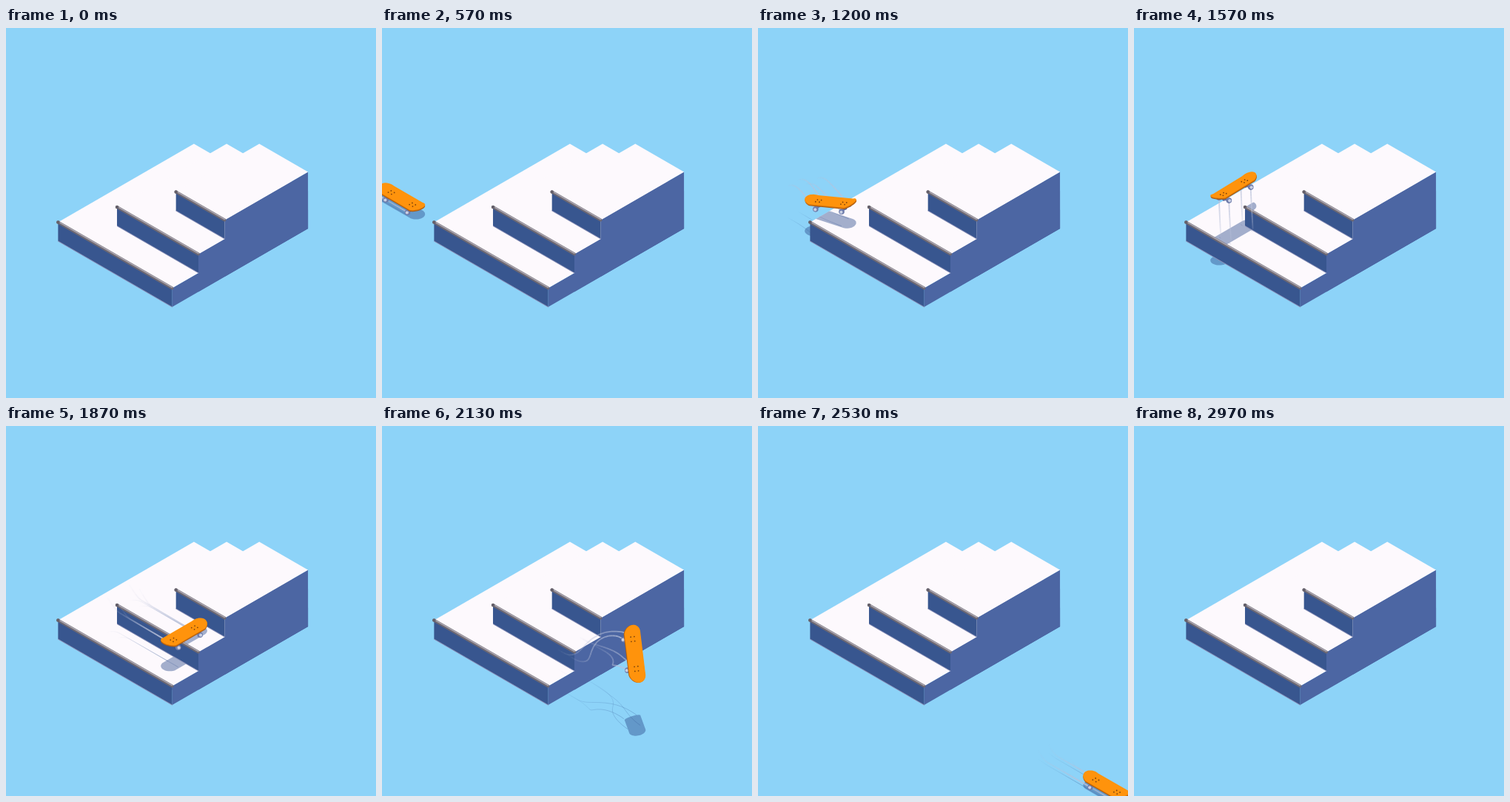
Write an HTML page with a canvas that moves like this. It is 500x500 px and loops after 3.03 s.

```html
<!DOCTYPE html>
<html lang="en">
<head>
<meta charset="utf-8">
<title>Skateboard on steps</title>
<style>
html, body { margin: 0; width: 100%; height: 100%; overflow: hidden; background: #8dd3f8; }
canvas { display: block; width: 500px; height: 500px; }
</style>
</head>
<body>
<canvas id="stage" width="500" height="500"></canvas>
<script>
const ctx = document.getElementById('stage').getContext('2d');
const LOOP = 3030, TRAIL = 210, STEP = 10, DEPTH = 212;

// Board attitudes: long axis and rough deck normal.
const aim = (axis, normal = [0, 0, 1]) => ({ axis, normal });
const FLAT = aim([1, 0, 0]), POP = aim([.87, 0, .5]), TURN = aim([.8, -.6, 0]);
const ACROSS = aim([0, -1, 0]), LEAN = aim([0, -1, .03], [-.25, 0, 1]);
const FLIP = aim([.49, .32, -.81], [.81, .17, .49]);

// time, x, sideways shift, height, attitude
const KEYS = [
  [300, -75, 0, 10, FLAT],
  [640, 38, 0, 10, FLAT],
  [870, 46, 0, 38, POP],
  [1070, 68, 0, 62, POP],
  [1310, 126, 0, 35, TURN],
  [1390, 139, 0, 35, ACROSS],
  [1570, 135, 0, 87, LEAN],
  [1625, 145, 7, 97, LEAN],
  [1700, 175, 25, 59, ACROSS],
  [1940, 267, 25, 58, ACROSS],
  [2130, 341, 19, 95, FLIP],
  [2360, 413, 0, 10, FLAT],
  [2960, 621, 0, 10, FLAT]
];

const BLOCKS = [0, 1, 2].map(i => ({ width: 178 - 51 * i, front: 41 * i, z: 25.5 * (i + 1) }));
const WHEELS = [-17, 17].flatMap(x => [-8, 8].map(y => [x, y, -6]));
const DECK = Array.from({ length: 48 }, (_, i) => {
  const a = (i + .5) / 48 * Math.PI * 2, c = Math.cos(a);
  const x = Math.sign(c) * 22 + 10 * c;
  return [x, 10 * Math.sin(a), Math.max(0, Math.abs(x) - 20) * .32];
});

// Monotone cubic interpolation, so contacts with the ground never overshoot.
function sample(t, get) {
  const last = KEYS.length - 1;
  if (t <= KEYS[0][0]) return get(KEYS[0]);
  if (t >= KEYS[last][0]) return get(KEYS[last]);
  const i = KEYS.findIndex(k => k[0] > t) - 1;
  const slope = j => (get(KEYS[j + 1]) - get(KEYS[j])) / (KEYS[j + 1][0] - KEYS[j][0]);
  const tangent = j => {
    if (j === 0) return slope(0);
    if (j === last) return slope(j - 1);
    const p = slope(j - 1), q = slope(j);
    return p * q > 0 ? 2 * p * q / (p + q) : 0;
  };
  const h = KEYS[i + 1][0] - KEYS[i][0], u = (t - KEYS[i][0]) / h, v = 1 - u;
  return get(KEYS[i]) * v * v * (1 + 2 * u) + get(KEYS[i + 1]) * u * u * (3 - 2 * u)
    + h * u * v * (tangent(i) * v - tangent(i + 1) * u);
}

function unit(a) {
  const n = Math.hypot(...a);
  return a.map(c => c / n);
}

function pose(t) {
  const [x, shift, z] = [1, 2, 3].map(c => sample(t, k => k[c]));
  const vector = name => [0, 1, 2].map(c => sample(t, k => k[4][name][c]));
  const X = unit(vector('axis')), n = vector('normal');
  const dot = X[0] * n[0] + X[1] * n[1] + X[2] * n[2];
  const N = unit(n.map((c, i) => c - dot * X[i]));
  const Y = [N[1] * X[2] - N[2] * X[1], N[2] * X[0] - N[0] * X[2], N[0] * X[1] - N[1] * X[0]];
  return { x, y: 225 + .577 * x - shift, z, X, Y, N };
}

function iso(x, y, a, b, z) {
  return [x + (a - b) * .866, y + (a + b) * .5 - z];
}

// Screen point on the board; a given floor height drops it onto that floor.
function project(p, [lx, ly, lz], floor) {
  const [a, b, c] = [0, 1, 2].map(i => p.X[i] * lx + p.Y[i] * ly + p.N[i] * lz);
  return iso(p.x, p.y, a, b, floor ?? p.z + c);
}

function path(points, close = true) {
  ctx.beginPath();
  points.forEach(q => ctx.lineTo(...q));
  if (close) ctx.closePath();
}

function fill(points, color) {
  path(points);
  ctx.fillStyle = color;
  ctx.fill();
}

function line(points, color, width) {
  path(points, false);
  ctx.strokeStyle = color;
  ctx.lineWidth = width;
  ctx.stroke();
}

function dot([x, y], r, color) {
  ctx.beginPath();
  ctx.arc(x, y, r, 0, Math.PI * 2);
  ctx.fillStyle = color;
  ctx.fill();
}

function trails(past, rgb, width, strength, floor) {
  ctx.lineCap = 'butt';
  for (const w of WHEELS) {
    for (let i = 1; i < past.length; i++) {
      const alpha = strength * (1 - i / past.length);
      line([project(past[i - 1], w, floor), project(past[i], w, floor)], `rgba(${rgb},${alpha})`, width);
    }
  }
  ctx.lineCap = 'round';
}

function shadow(past, floor) {
  trails(past, '50,85,145', 1, .3, floor);
  fill(DECK.map(q => project(past[0], q, floor)), 'rgba(45,75,140,.43)');
}

function block({ width, front, z }, past) {
  const at = (a, b, h) => iso(224.5, 377, a, b, h);
  const left = at(-width, -front, z), right = at(0, -front, z), base = z - 25.5;
  const top = [left, at(-width, -DEPTH, z), at(0, -DEPTH, z), right];
  const foot = [at(-width, -front, base), at(0, -front, base)];
  fill([right, at(0, -DEPTH, z), at(0, -DEPTH, 0), at(0, -front, 0)], '#4c66a3');
  fill([left, right, foot[1], foot[0]], '#38568f');
  line(foot, '#8a8fb8', 1);
  fill(top, '#fdf9fd');
  if (past[0].z > z) {
    ctx.save();
    path(top);
    ctx.clip();
    shadow(past, z);
    ctx.restore();
  }
  line([left, right], '#6d6872', 4);
  ctx.save();
  ctx.translate(0, -1);
  line([left, right], '#aaa5ae', 1.5);
  ctx.restore();
  dot(left, 2.3, '#66616b');
}

function board(p) {
  const at = (...q) => project(p, q);
  for (const x of [-17, 17]) {
    line([at(x, 0, -1), at(x, 0, -6)], '#56618f', 5);
    line([at(x, -8, -6), at(x, 8, -6)], '#67739f', 3);
  }
  for (const w of WHEELS) {
    dot(at(...w), 3.8, '#6f7cab');
    dot(at(w[0], w[1] + Math.sign(w[1]), w[2]), 2.1, '#c9d0e4');
  }
  ['#a85a12', '#d87508', '#ff930c'].forEach((color, i) =>
    fill(DECK.map(([x, y, z]) => at(x, y, z + i - 2)), color));
  for (const x of [-19, -14, 14, 19])
    for (const y of [-2.2, 2.2]) dot(at(x, y, 0), .9, '#7c420c');
}

function draw(t) {
  const past = [];
  for (let age = 0; age <= TRAIL; age += STEP) past.push(pose(t - age));
  ctx.fillStyle = '#8dd3f8';
  ctx.fillRect(0, 0, 500, 500);
  ctx.lineCap = ctx.lineJoin = 'round';
  shadow(past, 0);
  BLOCKS.forEach(b => block(b, past));
  trails(past, '186,194,218', 1.8, .85);
  board(past[0]);
}

const start = performance.now();
function tick() {
  draw((performance.now() - start) % LOOP);
  requestAnimationFrame(tick);
}
tick();
</script>
</body>
</html>
```
